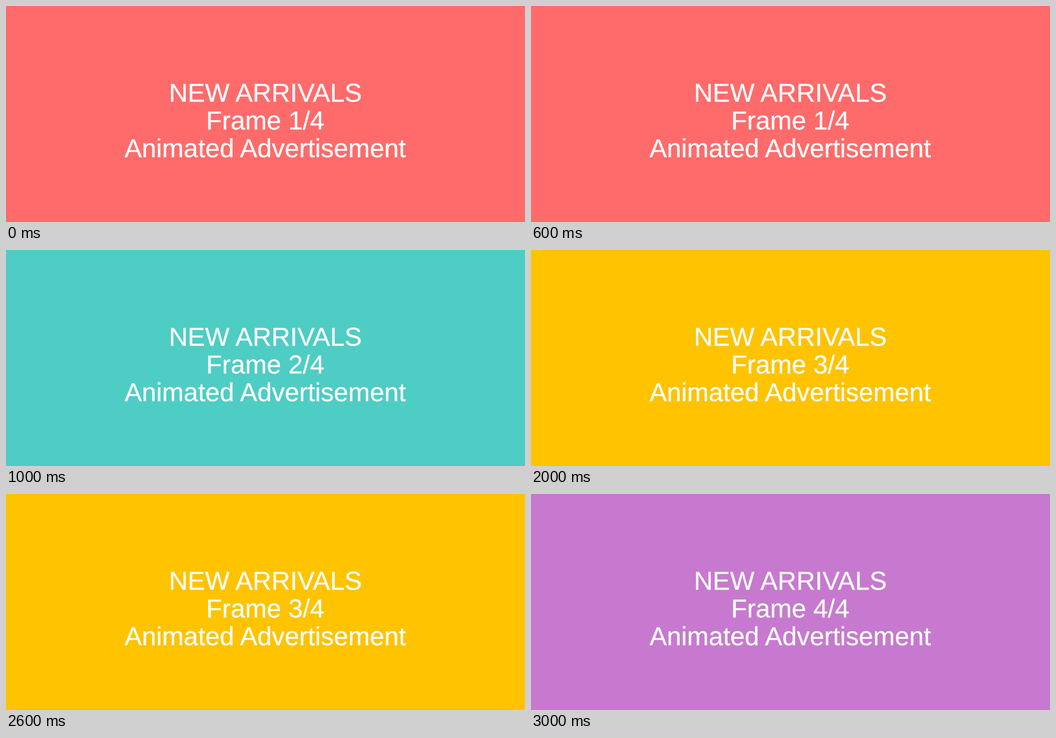
Write an HTML page that moves like this. It is 1159 by 483 pixels and loops after 4 s.

```html
<!DOCTYPE html>
<html lang="en">
<head>
<meta charset="utf-8">
<title>New arrivals banner</title>
<style>
  html, body { margin: 0; width: 100%; height: 100%; overflow: hidden; }
  svg {
    display: block;
    width: 100%;
    height: 100%;
    background: #ff6b6b;
    animation: hue 4s step-end infinite;
  }
  text {
    font: 57.96px Arial, "Liberation Sans", sans-serif;
    fill: #fff;
    stroke: #fff;
    stroke-width: .4px;
    text-rendering: geometricPrecision;
  }
  .digit { visibility: hidden; animation: turn 4s step-end infinite; }
  .d2 { animation-delay: -3s; }
  .d3 { animation-delay: -2s; }
  .d4 { animation-delay: -1s; }

  @keyframes hue {
    0% { background: #ff6b6b; }
    25% { background: #4ecdc4; }
    50% { background: #ffc300; }
    75% { background: #c779d0; }
  }
  @keyframes turn {
    0% { visibility: visible; }
    25%, 100% { visibility: hidden; }
  }
</style>
</head>
<body>
<svg viewBox="0 0 1159 483">
  <text x="364" y="214">NEW</text>
  <text x="512.2" y="214">ARRIVALS</text>

  <text x="447" y="276">Frame</text>
  <text class="digit" x="630.5" y="276">1</text>
  <text class="digit d2" x="630.5" y="276">2</text>
  <text class="digit d3" x="630.5" y="276">3</text>
  <text class="digit d4" x="630.5" y="276">4</text>
  <text x="662.7" y="276">/4</text>

  <text x="264.7" y="338">Animated</text>
  <text x="522.6" y="338">Advertisement</text>
</svg>
</body>
</html>
```
